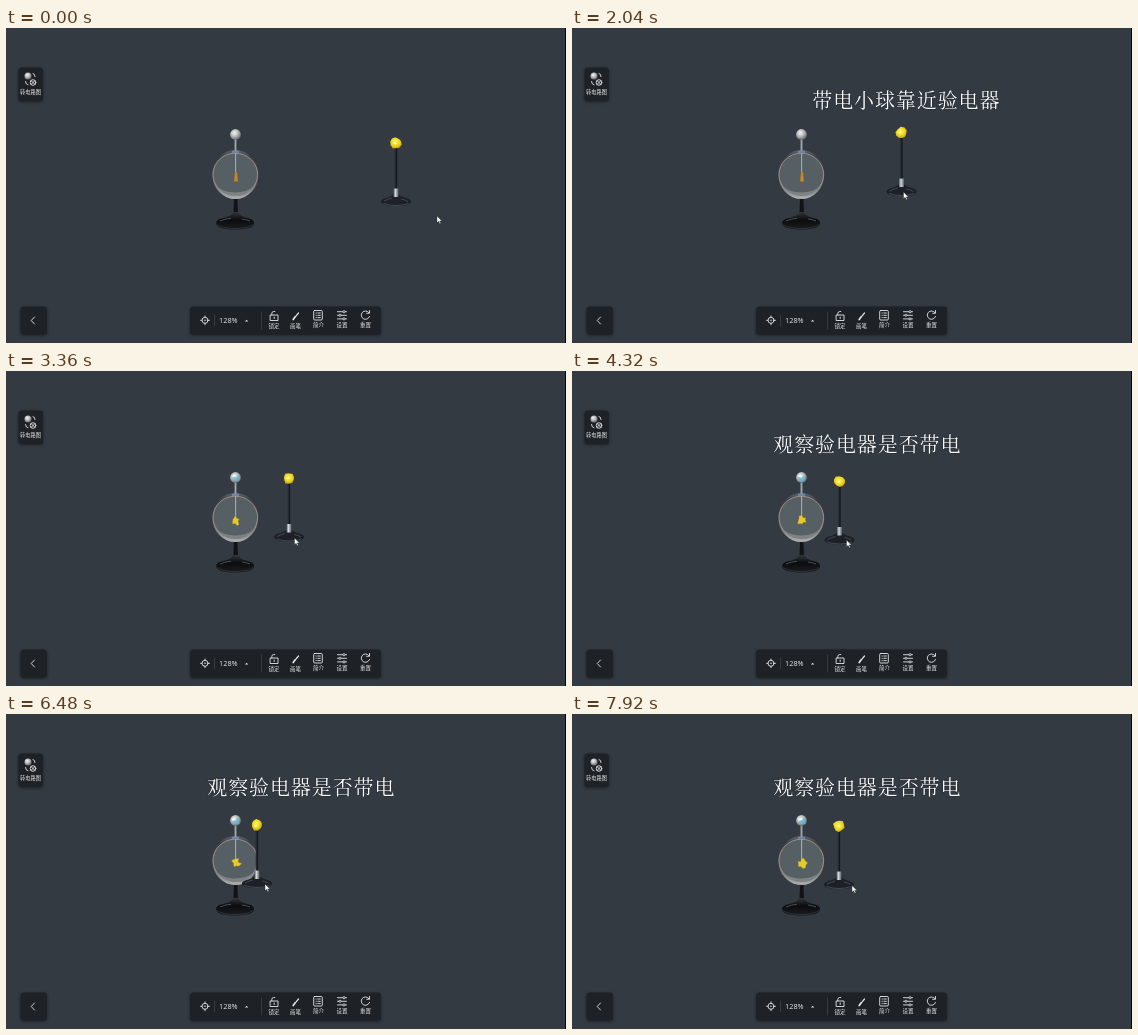
Animation of 560x315 px, one loop 8000 ms. Source, as an HTML page:

```html
<!DOCTYPE html>
<html lang="zh-CN">
<head>
<meta charset="utf-8">
<title>验电器</title>
<style>
  html, body { margin: 0; height: 100%; overflow: hidden; background: #333a42; }
  svg { display: block; width: 100vw; height: 100vh; }
  text { font-family: "Noto Sans CJK SC", "Noto Sans CJK", sans-serif; text-anchor: middle; fill: #e4e6e8; }
  .caption {
    font: 20px "Noto Serif CJK SC", "Noto Sans CJK SC", "Noto Sans CJK", serif;
    letter-spacing: .9px; fill: #fff; stroke: #20262c; stroke-width: .8; paint-order: stroke;
  }
  .label { font-size: 5.5px; font-weight: 500; }
  .panel { fill: #1e2226; filter: drop-shadow(0 1px 1.5px #1b2025); }
  .line { fill: none; stroke: #e4e6e8; stroke-width: .9; stroke-linecap: round; stroke-linejoin: round; }
</style>
</head>
<body>
<svg viewBox="0 0 560 315" preserveAspectRatio="none">
  <defs>
    <radialGradient id="steel" cx=".4" cy=".35" r=".65">
      <stop stop-color="#f4f4f4"/><stop offset=".5" stop-color="#b9bbbc"/><stop offset="1" stop-color="#676b6e"/>
    </radialGradient>
    <radialGradient id="yellow" cx=".45" cy=".4" r=".65">
      <stop stop-color="#fff45a"/><stop offset=".6" stop-color="#ecd41c"/><stop offset="1" stop-color="#b3941c"/>
    </radialGradient>
    <linearGradient id="drum" x2="0" y2="1">
      <stop stop-color="#5c6272"/><stop offset=".15" stop-color="#3b4046"/><stop offset=".5" stop-color="#4a4f53"/>
      <stop offset=".85" stop-color="#8f9294"/><stop offset="1" stop-color="#b0b1b1"/>
    </linearGradient>
    <linearGradient id="collar">
      <stop stop-color="#596068"/><stop offset=".4" stop-color="#d4d8dc"/><stop offset="1" stop-color="#535b64"/>
    </linearGradient>
    <linearGradient id="foot" x2="0" y2="1">
      <stop stop-color="#33363a"/><stop offset=".45" stop-color="#0b0c0e"/><stop offset="1" stop-color="#1b1d20"/>
    </linearGradient>
  </defs>

  <rect width="560" height="315" fill="#333a42"/>
  <path d="M559.5 0V315" stroke="#060708"/>

  <rect class="panel" x="12.5" y="39.5" width="24.5" height="33.5" rx="3.5"/>
  <circle cx="22" cy="48" r="3.5" fill="url(#steel)"/>
  <circle class="line" cx="27" cy="54.5" r="2.8"/>
  <path class="line" d="M25.2 52.7l3.6 3.6m0-3.6l-3.6 3.6M27 45.5q2 .3 2 3M19.5 53.5q0 3 2.5 3.3"/>
  <text class="label" x="24.5" y="66" style="font-size:5.2px">转电路图</text>

  <rect class="panel" x="14.5" y="278.5" width="26.5" height="28" rx="3.5"/>
  <path class="line" d="M28.5 289l-3.3 3.5 3.3 3.5"/>

  <rect class="panel" x="184" y="278.5" width="191" height="28" rx="3.5"/>
  <g class="line">
    <circle cx="199" cy="292.3" r="3"/>
    <path d="M199 287.9v1.4m0 6v1.4M194.600 292.3h1.4m6 0h1.4"/>
    <path d="M208.5 287v11M255.5 284v17" stroke="#41474d" stroke-width=".7"/>
    <path d="M264.5 287h7.5v5.5h-7.5zM265.8 287v-1.5q0-2 2-2h1M268.2 289v1.500"/>
    <path d="M292.5 285l-3 3.700" stroke-width="1.2"/>
    <path d="M289 289l-1.800 2.500" stroke-width="1.700"/>
    <rect x="307.7" y="282.5" width="8.6" height="9.5" rx="1"/>
    <path d="M310 285h.3m1.5 0h2.5M310 287.3h.3m1.5 0h2.5M310 289.6h.3m1.5 0h2.5"/>
    <path d="M331.5 283.7h9M331.5 287.3h9M331.5 290.9h9"/>
    <path d="M362.8 284.5a4.2 4.2 0 1 0 .7 4M363.5 282.5v2.8h-2.8"/>
  </g>
  <g fill="#1e2226" stroke="#e4e6e8" stroke-width=".8">
    <circle cx="338" cy="283.7" r="1.1"/><circle cx="334" cy="287.3" r="1.1"/><circle cx="338" cy="290.9" r="1.1"/>
  </g>
  <circle cx="199" cy="292.3" r=".8" fill="#e4e6e8"/>
  <path d="M239 293.600l1.600-1.800 1.600 1.800z" fill="#e4e6e8"/>
  <text x="222.3" y="295" style="font-size:7.3px;font-family:'Open Sans','Noto Sans',sans-serif">128%</text>
  <g id="labels"></g>

  <g id="electroscope">
    <path d="M228 170h3.4l.6 17h-4.6z" fill="#111316"/>
    <path d="M227.300 184h4.800q1.600 4.500 11 6.500 5 1.500 5 4.500 0 6.500-19 6.500t-19-6.500q0-3 5-4.500 10.600-2 12.200-6.500z" fill="url(#foot)"/>
    <path d="M214 193q6-2.500 11-2.700M236 191q5 .7 8 2" fill="none" stroke="#5a5e62" stroke-width=".8"/>
    <path d="M211 196.5q5 4 18 4t18-4" fill="none" stroke="#3d4145" stroke-width=".6"/>
    <ellipse cx="229.3" cy="146.5" rx="23" ry="24.5" fill="url(#drum)"/>
    <ellipse cx="229.3" cy="146.5" rx="22.3" ry="21.300" fill="#565f64" stroke="#b19c8e" stroke-width=".8"/>
    <path d="M210.500 158q6 9.800 18.800 10t18.800-10q-7 6.500-18.800 6.500t-18.800-6.500z" fill="#7d8284"/>
    <path d="M229.5 110v14" stroke="#a0a5a8" stroke-width="1.9"/>
    <path d="M226 123.800h7" stroke="#7186a8" stroke-width="2.2"/>
    <path d="M229.600 125v21" stroke="#a9adaf" stroke-width="1.100"/>
    <circle cx="229.5" cy="106.5" r="5.4" fill="url(#steel)"/>
    <path id="tint" fill="#5cb9d6"/>
    <path id="glint" fill="#e3f6fb"/>
    <path id="restLeaf" d="M229 144h2l1 9.500h-4z" fill="#c78a2d" stroke="#8f622a" stroke-width=".4"/>
    <path id="leaf" fill="#e6c92b" stroke="#a58624" stroke-width=".3"/>
  </g>

  <g id="stand">
    <path d="M0 4V47" stroke="#14171b" stroke-width="2.3"/>
    <path d="M-.7 6V45" stroke="#454c54" stroke-width=".5"/>
    <path d="M-3 51.500h6q2 2.300 7.500 3.500 4.500 1.300 4.500 3.200 0 4.800-15 4.800t-15-4.800q0-1.900 4.500-3.200 5.500-1.200 7.500-3.500z" fill="#1d2127"/>
    <path d="M-12 58q5-2.500 8-3M5 56q4 .7 7 2.500M-12.500 60.500q6 2 12.500 2t12.500-2" fill="none" stroke="#4c535c" stroke-width=".8"/>
    <path d="M-2.500 45.500h5v8.500h-5z" fill="url(#collar)"/>
    <circle r="4.8" fill="url(#yellow)"/>
    <path id="charge" fill="url(#yellow)"/>
    <path id="spark" fill="#fffba6"/>
  </g>

  <text class="caption" id="caption"></text>
  <path id="cursor" d="M0 0v6.800l1.600-1.500 1.200 2.500 1.100-.5-1.200-2.400h2.200z" fill="#fff" stroke="#20242a" stroke-width=".4"/>
</svg>
<script>
const LOOP = 8000, STEP = 120;
const el = id => document.getElementById(id);

// time, ball x, ball y, pointer x, pointer y
const path = [
  [0, 390, 115, 431, 188],
  [840, 390, 115, 393, 174],
  [1680, 355, 109, 358, 168],
  [2040, 329.5, 105, 331.5, 164],
  [2520, 305, 105.5, 309, 164.5],
  [3360, 283, 107.5, 288.5, 167],
  [4320, 267.5, 110.5, 274.5, 169],
  [5040, 260, 111.5, 268, 170],
  [5520, 254, 112, 261.5, 170],
  [6000, 251, 111, 259, 170],
  [6720, 251, 111, 259, 170],
  [7560, 254.5, 111, 265, 171],
  [7920, 267, 112, 280, 171.5]
];

const captions = [
  { from: 1200, to: 3000, x: 334.3, y: 80.3, text: "带电小球靠近验电器" },
  { from: 3720, to: LOOP, x: 295.3, y: 81.3, text: "观察验电器是否带电" }
];

el("labels").innerHTML = [[268, 300, "锁定"], [289.5, 300, "画笔"], [312.5, 299, "简介"], [336, 299, "设置"], [359.5, 299, "重置"]]
  .map(([x, y, name]) => `<text class="label" x="${x}" y="${y}">${name}</text>`).join("");

function sample(time) {
  const next = path.findIndex(key => key[0] > time);
  if (next < 0) return path.at(-1).slice(1);
  const a = path[next - 1], b = path[next];
  const k = (time - a[0]) / (b[0] - a[0]);
  return a.slice(1).map((v, i) => v + (b[i + 1] - v) * k);
}

function noise(n) {
  const s = Math.sin(n * 12.9898 + 4.1) * 43758.5453;
  return s - Math.floor(s);
}

// Irregular polygon whose outline depends on the seed
function blob(x, y, rx, ry, rough, seed, count = 10) {
  const points = Array.from({ length: count }, (_, i) => {
    const angle = (i + noise(seed)) / count * Math.PI * 2;
    const r = 1 - rough * noise(seed * 17 + i);
    return `${(x + Math.cos(angle) * rx * r).toFixed(2)} ${(y + Math.sin(angle) * ry * r).toFixed(2)}`;
  });
  return `M${points.join("L")}z`;
}

const place = (id, x, y) => el(id).setAttribute("transform", `translate(${x} ${y})`);
const shape = (id, d) => el(id).setAttribute("d", d);

function draw(now) {
  const step = Math.floor(now % LOOP / STEP), time = step * STEP;
  const [x, y, px, py] = sample(time);
  place("stand", x, y);
  place("cursor", px, py);

  shape("charge", blob(0, 0, 6.4, 6.4, .3, step + 1));
  shape("spark", blob(noise(step) * 3 - 2, noise(step + 9) * 3 - 2, 2.2, 1.6, .6, step + 5, 7));

  const charge = Math.max(0, Math.min(1, (318 - x) / 40));
  const charged = charge > 0;
  el("restLeaf").style.display = charged ? "none" : "";
  el("leaf").style.display = charged ? "" : "none";
  shape("leaf", blob(230.2, 149.5, 3 + 2.8 * charge, 6, .65, step + 3, 12));

  el("tint").style.opacity = charge * .75;
  el("glint").style.opacity = charge;
  shape("tint", blob(230.3, 107.5, 4.6, 3.8, .5, step + 7));
  shape("glint", blob(228.5, 105.2, 3, 2, .5, step + 11, 7));

  const caption = captions.find(c => time >= c.from && time < c.to);
  el("caption").textContent = caption ? caption.text : "";
  if (caption) place("caption", caption.x, caption.y);
}

const start = performance.now();
function tick() {
  draw(performance.now() - start);
  requestAnimationFrame(tick);
}
tick();
</script>
</body>
</html>
```
